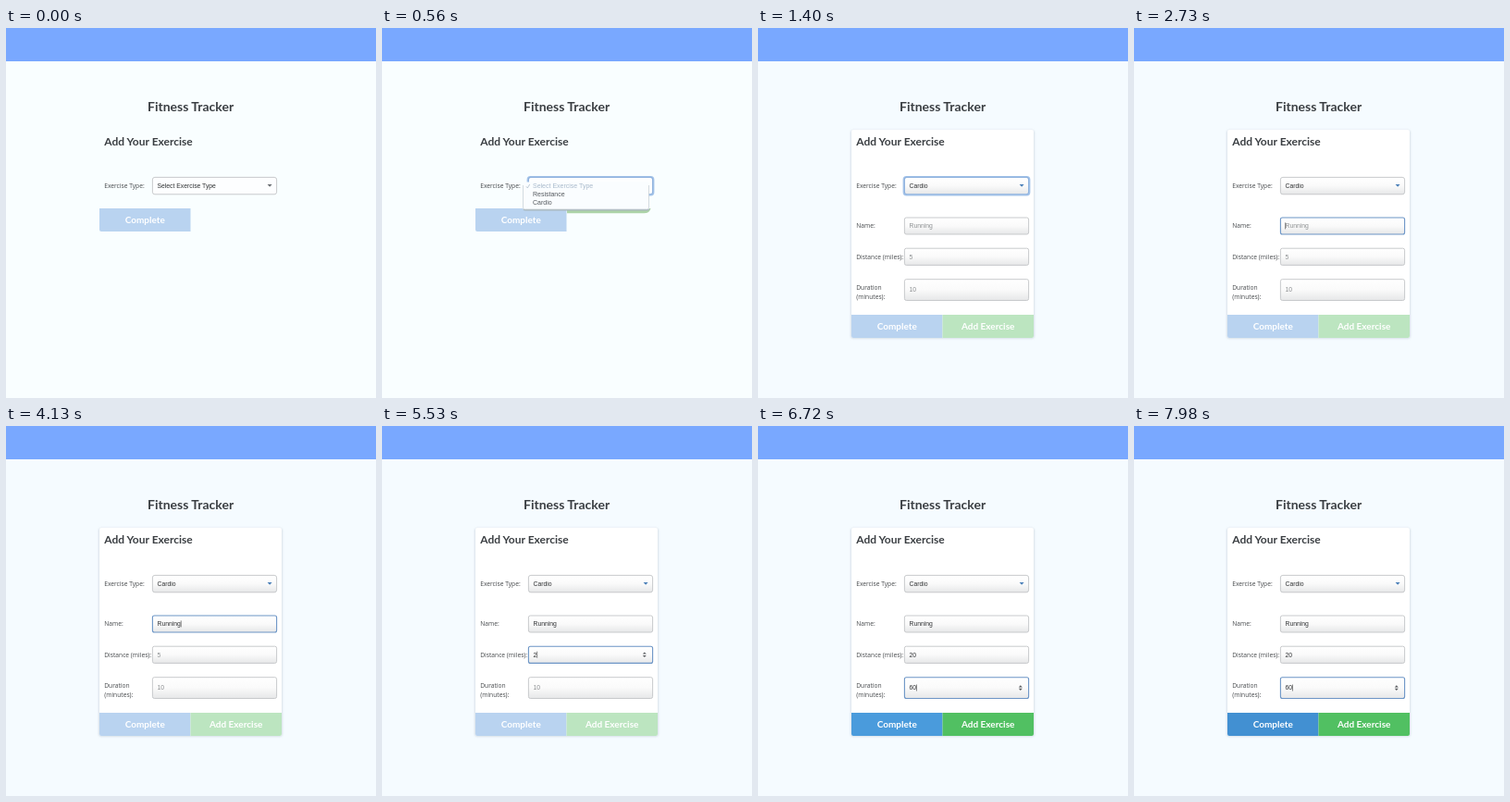
An HTML page that plays this animation: 400 px wide and 400 px high, repeating every 8 s.

```html
<!DOCTYPE html>
<html lang="en">
<head>
<meta charset="utf-8">
<title>Fitness Tracker</title>
<style>
  html, body { margin: 0; width: 100%; height: 100%; overflow: hidden; }
  svg { display: block; width: 100%; height: 100%; }
  text { white-space: pre; }
  .head { font: 700 14px Lato, sans-serif; fill: #3a3e42; }
  .sub { font-size: 12px; }
  .btn { font: 700 10px Lato, sans-serif; fill: #fff; text-anchor: middle; }
  .label { font: 6.7px "Open Sans", sans-serif; fill: #45484b; }
  .value { font: 6.8px "Liberation Sans", Arial, sans-serif; fill: #303234; }
  .menu { font-size: 7px; fill: #55595d; }
  .hint { fill: #8d9092; }
  .pale { fill: #a9bacb; }
  .box { fill: url(#sheen); stroke: #c2c4c7; stroke-width: .9; }
  .box.on { stroke: #6c95c6; stroke-width: 1.1; }
  .caret { stroke: #333; stroke-width: .6; }
  .spin { fill: #5a5d60; }
</style>
</head>
<body>
<svg viewBox="0 0 400 400" preserveAspectRatio="none">
  <defs>
    <linearGradient id="sheen" x2="0" y2="1">
      <stop offset="0" stop-color="#fff"/>
      <stop offset=".5" stop-color="#fafafa"/>
      <stop offset="1" stop-color="#e6e7e8"/>
    </linearGradient>
    <filter id="soft" x="-10%" y="-10%" width="120%" height="120%"><feGaussianBlur stdDeviation="1"/></filter>
  </defs>

  <rect id="page" width="400" height="400"/>
  <rect width="400" height="36" fill="#79a8ff"/>
  <text class="head" x="153" y="89.9">Fitness Tracker</text>

  <g id="card">
    <rect x="100.5" y="110.5" width="198" height="225" rx="2" fill="#b9c6d2" opacity=".7" filter="url(#soft)"/>
    <rect x="101" y="110" width="197" height="225" rx="2" fill="#fff"/>
  </g>
  <text class="head sub" x="106.2" y="126.6">Add Your Exercise</text>
  <text class="label" x="106.2" y="173.3">Exercise Type:</text>

  <g id="buttons">
    <path id="done" d="M101 310H199.5V335H103Q101 335 101 333Z"/>
    <path id="add" d="M199.5 310H298V333Q298 335 296 335H199.5Z"/>
    <text class="btn" x="150.2" y="326.3">Complete</text>
    <text class="btn" id="addText" x="248.7" y="326.3">Add Exercise</text>
  </g>

  <rect id="halo" x="157.5" y="160.8" width="136" height="19.8" rx="3" fill="none" stroke="#a6c5ea" stroke-width="1.8"/>
  <rect id="select" class="box" x="158.4" y="161.4" width="134.2" height="18.4" rx="2.5"/>
  <text id="choice" class="value" x="163.5" y="172.9"></text>
  <path id="arrow" d="M282.6 168.9h5l-2.5 2.8Z"/>

  <g id="menu">
    <path d="M200 195H290.5Q289.5 200.3 283 200.3H200Z" fill="#acd3a8"/>
    <path d="M152.5 195V196Q153 197.5 155 197.5H287Q289 197.5 289.3 195Z" fill="#a9b8bd"/>
    <rect x="152.5" y="166.5" width="136" height="29.5" fill="#fafdff"/>
    <path d="M152.5 170V194Q152.5 196 154.5 196H286.5Q288.5 196 288.5 194V170" fill="none" stroke="#c3cbd2" stroke-width=".7"/>
    <path d="M156 171.3l1.3 1.7 2.4-4" fill="none" stroke="#aab9c8" stroke-width=".7"/>
    <text class="value menu pale" x="163" y="173.1">Select Exercise Type</text>
    <text class="value menu" x="163" y="182.3">Resistance</text>
    <text class="value menu" x="163" y="191.4">Cardio</text>
  </g>

  <g id="form">
    <text class="label" x="106.2" y="216.3">Name:</text>
    <text class="label" x="106.2" y="249.6">Distance (miles):</text>
    <text class="label" x="106.2" y="283.3">Duration</text>
    <text class="label" x="106.2" y="292.8">(minutes):</text>
  </g>
</svg>
<script>
const LOOP = 8000, FORM_AT = 1120, MENU_AT = 280;
const BLUE = { faded: [185, 211, 240], full: [74, 155, 220], hover: [66, 144, 210] };
const GREEN = { faded: [188, 229, 192], full: [81, 192, 98] };

const $ = id => document.getElementById(id);
const show = (el, on) => el.setAttribute('visibility', on ? 'visible' : 'hidden');
const within = (t, a, b) => t >= a && t < b;
const ramp = (t, start, len) => {
  const k = Math.min(1, Math.max(0, (t - start) / len));
  return k * k * (3 - 2 * k);
};
const blend = (a, b, k) => a.map((v, i) => Math.round(v + (b[i] - v) * k));
const paint = (el, rgb) => el.setAttribute('fill', `rgb(${rgb})`);

function make(name, attrs) {
  const el = document.createElementNS('http://www.w3.org/2000/svg', name);
  for (const key in attrs) el.setAttribute(key, attrs[key]);
  return $('form').appendChild(el);
}

// keys: time at which each character is typed
const fields = [
  { y: 205, h: 18, hint: 'Running', text: 'Running', from: 2450, to: 4340,
    keys: [3500, 3570, 3640, 3780, 3850, 3920, 4060] },
  { y: 238.2, h: 18.2, hint: '5', text: '20', from: 4340, to: 5880, keys: [5390, 5600], number: true },
  { y: 271.7, h: 22.8, hint: '10', text: '60', from: 5880, to: LOOP, keys: [6300, 6580], number: true }
];

for (const f of fields) {
  const mid = f.y + f.h / 2;
  f.box = make('rect', { x: 158.4, y: f.y, width: 134.2, height: f.h, rx: 2 });
  f.label = make('text', { x: 163.5, y: mid + 2.2 });
  f.caret = make('path', { class: 'caret', d: `M0 ${mid - 3.6}v7` });
  if (f.number) f.spin = make('path', {
    class: 'spin',
    d: `M281.8 ${mid - .7}h4l-2 -2.1ZM281.8 ${mid + .7}h4l-2 2.1Z`
  });
}

function drawField(f, t) {
  const count = f.keys.filter(k => t >= k).length;
  const focus = within(t, f.from, f.to);
  f.label.textContent = count ? f.text.slice(0, count) : f.hint;
  f.label.setAttribute('class', count ? 'value' : 'value hint');
  f.box.setAttribute('class', focus ? 'box on' : 'box');
  const last = count ? f.keys[count - 1] : f.from;
  const lit = (t - last) % 1000 < 500;
  const end = count ? f.label.getComputedTextLength() + .4 : .1;
  f.caret.setAttribute('transform', `translate(${163.5 + end} 0)`);
  f.caret.setAttribute('visibility', focus && lit ? 'inherit' : 'hidden');
  if (f.spin) f.spin.setAttribute('visibility', focus ? 'inherit' : 'hidden');
}

function draw(t) {
  const open = t >= FORM_AT;
  const ring = within(t, 140, 2450);
  $('page').setAttribute('fill', open ? '#f5fbff' : '#f9feff');
  for (const id of ['card', 'form', 'add', 'addText']) show($(id), open);
  show($('menu'), within(t, MENU_AT, FORM_AT));
  show($('halo'), ring);

  $('select').setAttribute('class', ring ? 'box on' : 'box');
  $('select').style.fill = open ? '' : '#fdfeff';
  $('select').style.stroke = ring ? '#8fb2de' : '';
  $('choice').textContent = open ? 'Cardio' : 'Select Exercise Type';
  $('arrow').setAttribute('fill', open ? '#4a7fb8' : '#6a6e72');

  $('buttons').setAttribute('transform', `translate(0 ${open ? 0 : -115})`);
  const ready = ramp(t, 6300, 140);
  const active = blend(BLUE.full, BLUE.hover, ramp(t, 7490, 140));
  paint($('done'), blend(BLUE.faded, active, ready));
  paint($('add'), blend(GREEN.faded, GREEN.full, ready));

  fields.forEach(f => drawField(f, t));
}

const start = performance.now();
function tick(now) {
  draw(Math.max(0, now - start) % LOOP);
  requestAnimationFrame(tick);
}
draw(0);
requestAnimationFrame(tick);
</script>
</body>
</html>
```
